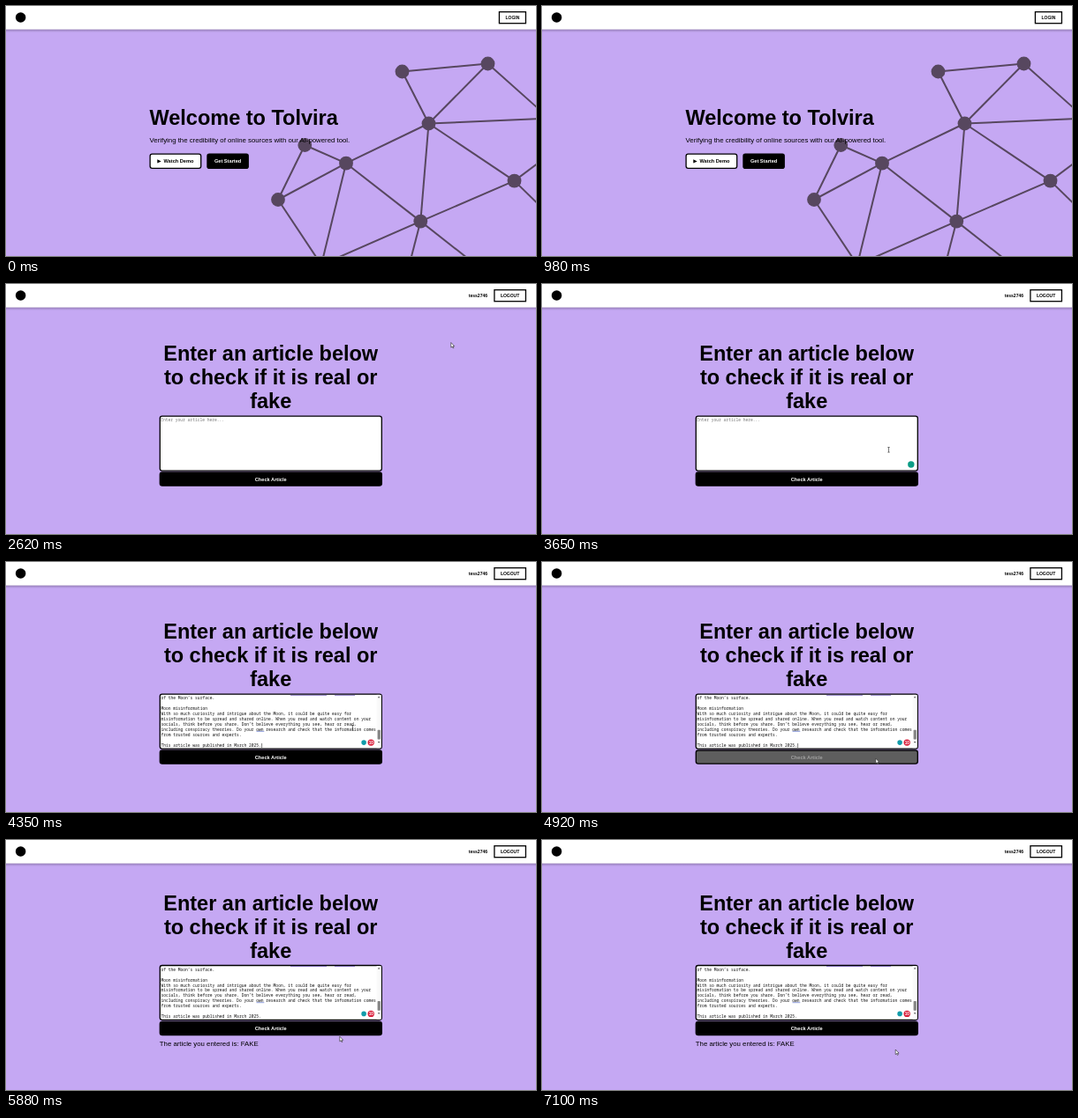
Write an HTML page that moves like this. It is 600x284 px and loops after 7.14 s.

```html
<!DOCTYPE html>
<html lang="en">
<head>
<meta charset="utf-8">
<title>Article checker</title>
<style>
  html, body { margin: 0; width: 100%; height: 100%; overflow: hidden; background: #c5a8f3; }
  svg { display: block; width: 600px; height: 284px; font-family: "Liberation Sans", Arial, sans-serif; }
  text { white-space: pre; }
  .title { font-size: 23.5px; font-weight: bold; }
  .body { font-size: 7.8125px; }
  .btn { font-size: 5.65px; font-weight: bold; }
  .nav { font-size: 5px; font-weight: bold; }
  .mono { font: 4.62px "Noto Sans Mono", "DejaVu Sans Mono", monospace; }
  .mid { text-anchor: middle; }
  .box { fill: #fff; stroke: #000; stroke-width: 1.3; }
</style>
</head>
<body>
<svg viewBox="0 0 600 284">
  <defs>
    <linearGradient id="shade" x2="0" y2="1">
      <stop stop-color="#54456a" stop-opacity=".5"/>
      <stop offset="1" stop-color="#54456a" stop-opacity="0"/>
    </linearGradient>
    <clipPath id="field"><rect x="174.6" y="150.6" width="250.4" height="61"/></clipPath>
  </defs>
  <rect width="600" height="284" fill="#c5a8f3"/>

  <g id="home">
    <g id="net" fill="#57475f" stroke="#57475f" stroke-width="2"></g>
    <text class="title" x="162.5" y="135">Welcome to Tolvira</text>
    <text class="body" x="162.6" y="155.3">Verifying the credibility of online sources with our AI-powered tool.</text>
    <rect class="box" x="163.1" y="168.2" width="57.6" height="16.2" rx="2.4"/>
    <path d="M171.3 174.2l4.4 2.2-4.4 2.2z"/>
    <text class="btn" x="178.5" y="178.4">Watch Demo</text>
    <rect x="227.3" y="167.6" width="47.6" height="17.4" rx="2.8"/>
    <text class="btn mid" x="251.1" y="178.4" fill="#fff">Get Started</text>
  </g>

  <g id="check">
    <g class="title mid">
      <text x="299.7" y="87.3">Enter an article below</text>
      <text x="299.7" y="114.3">to check if it is real or</text>
      <text x="299.7" y="141.3">fake</text>
    </g>
    <rect class="box" x="174.3" y="150.2" width="251" height="62" rx="2.4"/>
    <text id="hint" class="mono" x="175.2" y="156.3" fill="#777">Enter your article here...</text>
    <circle id="helper" cx="417.8" cy="205" r="3.7" fill="#0b9c86"/>
    <g id="article" clip-path="url(#field)">
      <g id="lines" class="mono" fill="#111"></g>
      <path d="M322 151.3h41m9 0h23" stroke="#6a55b5" stroke-width=".8"/>
      <path d="M283.5 192.4h8.8" stroke="#4a63c8" stroke-width=".6"/>
      <rect x="419.6" y="150.8" width="5" height="60.6" fill="#fafafa"/>
      <rect x="420.6" y="190.8" width="3.2" height="10.6" rx=".6" fill="#858585"/>
      <path d="M420.8 154.3l1.3-1.8 1.3 1.8zM420.8 204l1.3 1.8 1.3-1.8z" fill="#555"/>
      <rect x="401" y="201" width="17" height="8.2" rx="4.1" fill="#fff"/>
      <circle cx="405.1" cy="205.1" r="2.8" fill="#129caa"/>
      <circle cx="413.2" cy="205.1" r="3.7" fill="#d9203c"/>
      <text class="mid" x="413.2" y="206.8" font-size="4.6" font-weight="bold" fill="#fff">10</text>
      <path id="caret" d="M289.6 206v5" stroke="#000" stroke-width=".5"/>
    </g>
    <rect id="send" x="174.3" y="214" width="251" height="15.2" rx="2.6" stroke="#000" stroke-width="1.3"/>
    <text id="sendText" class="btn mid" x="299.7" y="223.6">Check Article</text>
    <text id="result" class="body" x="173.8" y="241.6">The article you entered is: FAKE</text>
  </g>

  <rect y="26" width="600" height="4" fill="url(#shade)"/>
  <rect width="600" height="26.6" fill="#fff"/>
  <circle cx="16.6" cy="13" r="5.8"/>
  <g id="signedOut" class="nav mid">
    <rect id="login" class="box" x="558.4" y="6.7" width="30" height="13"/>
    <text id="loginText" x="573.4" y="15">LOGIN</text>
  </g>
  <g id="signedIn" class="nav">
    <text x="545" y="15" text-anchor="end">tess2746</text>
    <rect class="box" x="552.9" y="6.7" width="35.5" height="13"/>
    <text class="mid" x="570.6" y="15">LOGOUT</text>
  </g>
  <g id="status">
    <rect y="279" width="78" height="5" fill="#1c1013"/>
    <text x=".8" y="283" font-size="3.8" fill="#c98a72">https://127.0.0.1:8000/accounts/google/login/</text>
  </g>

  <g id="cursor" stroke-linejoin="round">
    <path id="arrow" d="M0 0v5.6l1.3-1.1 .9 1.9 .9-.4-.9-1.9h1.7z" fill="#fff" stroke="#222" stroke-width=".6"/>
    <path id="beam" d="M-1.2-2.8h2.4M0-2.8v5.6M-1.2 2.8h2.4" fill="none" stroke="#222" stroke-width=".6"/>
    <path id="hand" d="M-.6 0q.6-.7 1.2 0v2.2l2.3.6v2.4l-.8 1.5h-2.6l-1.8-2.6.6-.6 1.1.8z" fill="#fff" stroke="#222" stroke-width=".5"/>
  </g>
</svg>
<script>
const LOOP = 7140, FADE = 500;
const HOVER = 1450, SIGN_IN = 2300, PASTE = 4080, PRESS = 4805, RESULT = 5180;
const $ = id => document.getElementById(id);
const show = (id, on) => { $(id).style.display = on ? '' : 'none'; };
const clamp = x => Math.max(0, Math.min(1, x));
const gray = v => { const n = Math.round(255 * v); return `rgb(${n},${n},${n})`; };

const nodes = [
  [448.5, 74.5], [545.5, 65.5], [478.5, 133.5], [338.3, 158], [385, 178.7], [308, 220],
  [469.3, 244.6], [575.5, 198.6], [357, 294], [640, 150], [640, 126.5], [640, 262], [532, 294], [455, 300]
];
const edges = [
  [0, 1], [0, 2], [1, 2], [1, 9], [2, 10], [2, 4], [2, 6], [2, 7], [3, 4], [3, 5], [4, 5],
  [4, 6], [4, 8], [5, 8], [6, 8], [6, 7], [6, 12], [6, 13], [7, 9], [7, 11]
];
$('net').innerHTML =
  edges.map(([a, b]) => `<path d="M${nodes[a]}L${nodes[b]}"/>`).join('') +
  nodes.slice(0, 8).map(([x, y]) => `<circle cx="${x}" cy="${y}" r="7.9" stroke="none"/>`).join('');

$('lines').innerHTML = [
  'of the Moon’s surface.', '', 'Moon misinformation',
  'With so much curiosity and intrigue about the Moon, it could be quite easy for',
  'misinformation to be spread and shared online. When you read and watch content on your',
  'socials, think before you share. Don’t believe everything you see, hear or read,',
  'including conspiracy theories. Do your own research and check that the information comes',
  'from trusted sources and experts.', '', 'This article was published in March 2025.'
].map((s, i) => `<text x="175.4" y="${156.4 + i * 5.94}">${s}</text>`).join('');

// cubic-bezier(.25, .1, .25, 1), solved by bisection
function ease(x) {
  x = clamp(x);
  let lo = 0, hi = 1;
  for (let i = 0; i < 20; i++) {
    const u = (lo + hi) / 2, v = 1 - u;
    if (.75 * v * v * u + .75 * v * u * u + u ** 3 < x) lo = u; else hi = u;
  }
  return .3 * (1 - lo) ** 2 * lo + 3 * (1 - lo) * lo * lo + lo ** 3;
}

// time, x, y
const path = [
  [1000, 520, 110], [1500, 574, 13.5], [2300, 574, 13.5], [2600, 503.8, 66.5], [2700, 503.8, 66.5],
  [3300, 392.5, 188.3], [4500, 392.5, 188.3], [4850, 377.8, 223.2], [5980, 377.8, 223.2], [6800, 400.2, 238]
];
function pointer(t) {
  const i = path.findIndex(p => p[0] > t);
  if (i < 0) return path[path.length - 1].slice(1);
  if (i === 0) return path[0].slice(1);
  const [t0, x0, y0] = path[i - 1], [t1, x1, y1] = path[i];
  const u = (t - t0) / (t1 - t0), k = u * u * (3 - 2 * u);
  return [x0 + (x1 - x0) * k, y0 + (y1 - y0) * k];
}

function draw(t) {
  const inside = t >= SIGN_IN, pasted = t >= PASTE, done = t >= RESULT;
  const overLogin = t >= HOVER && !inside;
  show('home', !inside);
  show('signedOut', !inside);
  show('check', inside);
  show('signedIn', inside);
  show('status', overLogin);

  const dark = ease((t - HOVER) / FADE);
  $('login').style.fill = gray(1 - dark);
  $('loginText').style.fill = gray(dark);

  const light = ease((Math.min(t, RESULT) - PRESS) / FADE) * (1 - ease((t - RESULT) / FADE));
  $('send').style.fill = gray(light);
  $('sendText').style.fill = gray(1 - light);

  $('check').setAttribute('transform', `translate(0 ${done ? -7.7 : 0})`);
  show('hint', !pasted);
  show('article', pasted);
  show('caret', !done);
  show('result', done);

  const [x, y] = pointer(t);
  const overField = inside && x < 425 && y > 150 && y < 212;
  show('helper', !pasted && t > 3150);
  show('cursor', t >= path[0][0]);
  show('hand', overLogin);
  show('beam', overField);
  show('arrow', !overLogin && !overField);
  $('cursor').setAttribute('transform', `translate(${x} ${y})`);
}

const start = performance.now();
function tick() {
  draw((performance.now() - start) % LOOP);
  requestAnimationFrame(tick);
}
tick();
</script>
</body>
</html>
```
